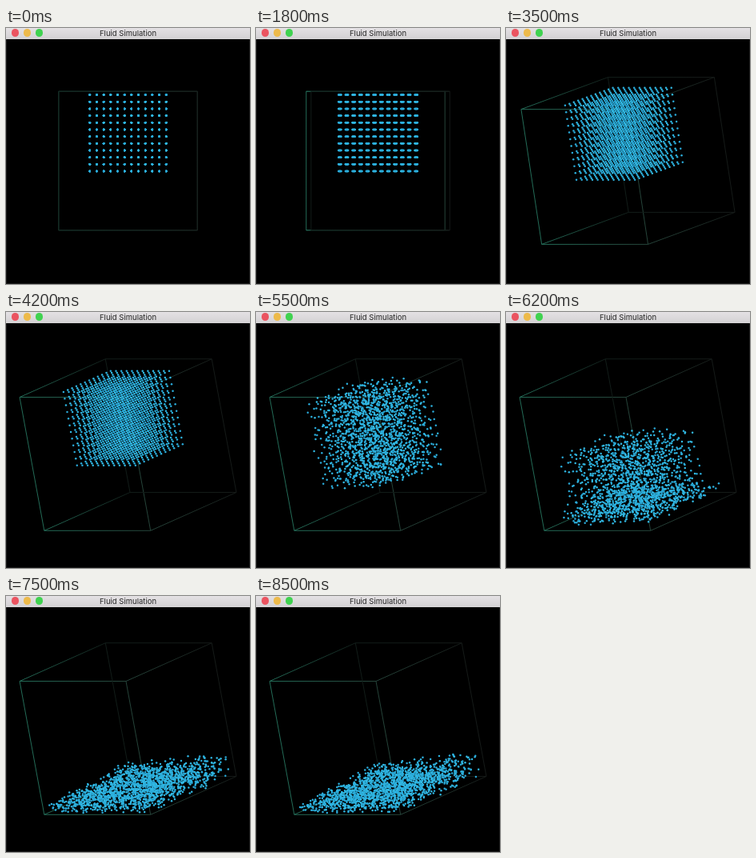
An HTML page with a canvas for the animation above (9100 ms loop, 305x320 px).

```html
<!DOCTYPE html>
<html lang="en">
<head>
<meta charset="utf-8">
<title>Fluid Simulation</title>
<style>
  html, body { margin: 0; width: 100%; height: 100%; overflow: hidden; background: #000; }
  #stage { position: relative; width: 305px; height: 320px; overflow: hidden; background: #000; }
  canvas { position: absolute; left: 0; top: 0; }
  .bar {
    position: absolute; left: 0; top: 0; width: 305px; height: 14px;
    background: linear-gradient(#e4e1e4, #d3d1d3);
    font: 9.5px/13px Inter, Roboto, sans-serif; color: #262626; text-align: center;
  }
  .bar i { position: absolute; top: 1.3px; width: 9.4px; height: 9.4px; border-radius: 50%; }
  .edge { position: absolute; top: 14px; bottom: 0; width: 1px; background: #1c1c1c; }
  .foot { position: absolute; left: 0; bottom: 0; width: 305px; height: 1px; background: #1c1c1c; }
</style>
</head>
<body>
<div id="stage">
  <canvas id="view" width="305" height="320"></canvas>
  <div class="edge" style="left:0"></div>
  <div class="edge" style="right:0"></div>
  <div class="foot"></div>
  <div class="bar">
    <i style="left:6.8px;background:#ea5460"></i>
    <i style="left:21.8px;background:#edba4a"></i>
    <i style="left:36.8px;background:#40d250"></i>
    Fluid Simulation
  </div>
</div>
<script>
const ctx = document.getElementById('view').getContext('2d');
const LOOP = 9100, HALF = 86.75, CELL = HALF / 10, N = 12;
const CX = 152.5, CY = 166, FLOOR = 85.5, GRAVITY = 0.55;
const BLOCK = CELL * (N - 1) / 2, BLOCK_Y = -HALF + CELL / 2 + BLOCK;

// Piecewise linear tracks: [ms, value]
const YAW = [[1700, 0], [1800, 2], [1900, 6], [2000, 8], [2100, 8], [2700, 40]];
const PITCH = [[2700, 0], [3100, 8], [3700, 16]];
const STEPS = [[4700, 0], [5200, 5], [5400, 5], [5500, 6], [7900, 30], [8000, 30], [8500, 35]];

function track(keys, t) {
  if (t <= keys[0][0]) return keys[0][1];
  for (let i = 1; i < keys.length; i++) {
    const [t0, a] = keys[i - 1], [t1, b] = keys[i];
    if (t <= t1) return a + (b - a) * (t - t0) / (t1 - t0);
  }
  return keys[keys.length - 1][1];
}

const clamp = (v, lo, hi) => Math.max(lo, Math.min(hi, v));
const mix = (a, b, k) => a + (b - a) * k;

let seed = 20177;
function rand() {
  seed = (Math.imul(seed, 1664525) + 1013904223) >>> 0;
  return seed / 4294967296;
}
const spread = () => rand() * 2 - 1;

const drops = [];
for (let k = N - 1; k >= 0; k--)
  for (let j = 0; j < N; j++)
    for (let i = 0; i < N; i++) {
      const unit = n => n * 2 / (N - 1) - 1;
      const u = unit(i), v = unit(j), w = unit(k);
      const endX = clamp(u * 72 + spread() * 24, -84 + rand() * 6, 84 - rand() * 6);
      const endZ = clamp(w * 72 + spread() * 24, -84 + rand() * 6, 84 - rand() * 6);
      const pile = rand() * (12 + 22 * (1 - v));
      const level = Math.pow(rand(), 1.1);
      const land = Math.sqrt((FLOOR - pile - BLOCK_Y - v * BLOCK * 1.2) / GRAVITY);
      drops.push({ u, v, w, endX, endZ, pile, level, land,
        jx: spread() * 4.5, jy: spread() * 4.5, jz: spread() * 4.5,
        phase: rand() * 6.28, tone: Math.floor(rand() * 3) });
    }
const TONES = ['#2db2df', '#32b9e3', '#2aa9d8'];

function place(d, n) {
  const loose = Math.min(n / 6, 1);
  const size = BLOCK * (1 + Math.min(n / 60, 0.22));
  const x = d.u * size + d.jx * loose;
  const z = d.w * size + d.jz * loose;
  const fall = BLOCK_Y + d.v * size + d.jy * loose + GRAVITY * n * n;
  const k = clamp((n - d.land) / 7, 0, 1);
  const s = 1 - (1 - k) * (1 - k);
  const drift = 4 * s * Math.sin(n * 0.3 + d.phase);
  const tilt = 6 * clamp((n - 16) / 12, 0, 1);
  const rest = d.level * (20 + tilt * (d.endX + d.endZ) / HALF);
  return [
    clamp(mix(x, d.endX + drift, s), -85, 85),
    Math.min(fall, FLOOR - mix(d.pile, rest, s)),
    clamp(mix(z, d.endZ - drift, s), -85, 85)
  ];
}

function camera(t) {
  const b = track(YAW, t) * Math.PI / 180, a = track(PITCH, t) * Math.PI / 180;
  const ca = Math.cos(a), sa = Math.sin(a), cb = Math.cos(b), sb = Math.sin(b);
  return ([x, y, z]) => [CX + cb * x + sb * (sa * y + ca * z), CY + ca * y - sa * z];
}

// Corner colours by x and z side
const corner = (x, z) => z < 0
  ? (x < 0 ? '#236b57' : '#254339')
  : (x < 0 ? '#111c18' : '#151a18');

function edge(project, p, q) {
  const [x0, y0] = project(p.map(c => c * HALF)), [x1, y1] = project(q.map(c => c * HALF));
  const g = ctx.createLinearGradient(x0, y0, x1, y1);
  g.addColorStop(0, corner(p[0], p[2]));
  g.addColorStop(1, corner(q[0], q[2]));
  ctx.strokeStyle = g;
  ctx.beginPath();
  ctx.moveTo(x0, y0);
  ctx.lineTo(x1, y1);
  ctx.stroke();
}

// Far edges go last, so they cover the near ones in the flat view
function drawBox(project) {
  const sides = [-1, 1];
  ctx.lineWidth = 1;
  for (const x of sides)
    for (const y of sides) edge(project, [x, y, -1], [x, y, 1]);
  for (const z of sides)
    for (const s of sides) {
      edge(project, [-1, s, z], [1, s, z]);
      edge(project, [s, -1, z], [s, 1, z]);
    }
}

function draw(t) {
  const project = camera(t), n = track(STEPS, t);
  ctx.fillStyle = '#000';
  ctx.fillRect(0, 0, 305, 320);
  drawBox(project);
  for (const d of drops) {
    const [x, y] = project(place(d, n));
    ctx.fillStyle = TONES[d.tone];
    ctx.beginPath();
    ctx.arc(x, y, 1.25, 0, 7);
    ctx.fill();
  }
}

let start = null, shown = -1;
function tick(now) {
  if (start === null) start = now;
  const t = Math.floor(((now - start) % LOOP) / 100) * 100;
  if (t !== shown) draw(shown = t);
  requestAnimationFrame(tick);
}
draw(0);
requestAnimationFrame(tick);
</script>
</body>
</html>
```
